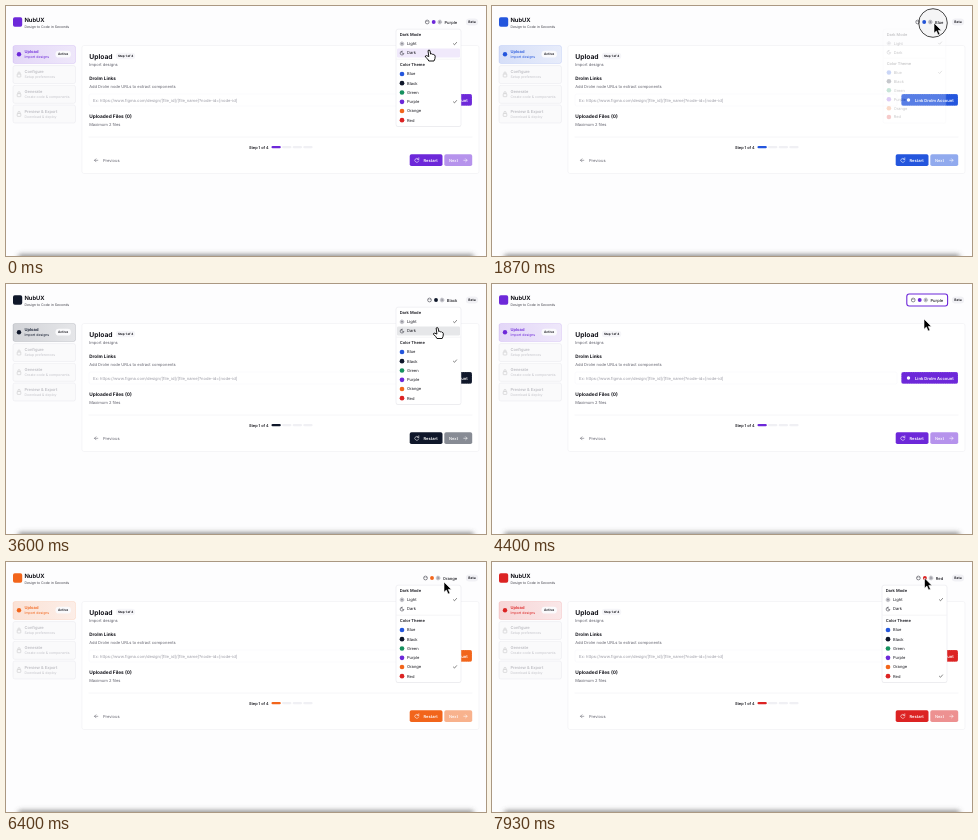
Recreate the animation shown at these times as an HTML page. Size 480 by 250 pixels, loop 8 s.

```html
<!DOCTYPE html>
<html lang="en">
<head>
<meta charset="utf-8">
<title>Theme picker</title>
<style>
html, body { margin: 0; width: 100%; height: 100%; overflow: hidden; background: #fff; }
svg { display: block; width: 100vw; height: 100vh; }
text { font-family: Inter, "Open Sans", sans-serif; font-size: 4.06px; fill: #15151c; text-rendering: geometricPrecision; white-space: pre; }
.main { fill: var(--main); }
.slow { fill: var(--slow); }
.line { fill: none; stroke-width: .55; stroke-linecap: round; stroke-linejoin: round; }
</style>
</head>
<body>
<svg id="stage" viewBox="0 0 480 250" xmlns="http://www.w3.org/2000/svg"></svg>
<script>
const LOOP = 8000;
const stage = document.getElementById('stage');

// Theme: color, menu row center, left edge of the label in the trigger
const themes = {
  Blue: { rgb: [36, 86, 221], row: 68, label: 443 },
  Black: { rgb: [15, 23, 42], row: 77.2, label: 440.8 },
  Green: { rgb: [22, 145, 95], row: 86.5, label: 440 },
  Purple: { rgb: [109, 40, 217], row: 95.8, label: 438.5 },
  Orange: { rgb: [242, 101, 27], row: 105, label: 436.8 },
  Red: { rgb: [220, 35, 35], row: 114.2, label: 443.7 }
};
const picks = [
  [-1000, 'Purple'], [1070, 'Blue'], [2570, 'Black'],
  [4030, 'Purple'], [5480, 'Orange'], [7080, 'Red']
];
const opens = [-1000, 1850, 3280, 4640, 6200, 7760];
const ripples = [1850, 6200, 7760];
// time, x, y of the pointer tip
const path = [
  [0, 423, 44], [70, 423, 44], [870, 419, 66], [1130, 419, 66], [1790, 442, 17],
  [1930, 442, 17], [2500, 424, 75], [2650, 424, 75], [2800, 428, 52], [3180, 437, 17],
  [3380, 437, 17], [3940, 420, 94], [4080, 420, 94], [4400, 432, 35], [4580, 438, 17],
  [4720, 438, 17], [5270, 417, 99], [5600, 417, 99], [6100, 437, 17], [6300, 437.5, 18],
  [6400, 438, 20], [6900, 416, 111], [7120, 416, 111], [7690, 432.5, 16], [8000, 432.5, 16]
];

const clamp = v => Math.max(0, Math.min(1, v));
const ease = v => { const c = clamp(v); return c * c * (3 - 2 * c); };
const css = rgb => `rgb(${rgb.map(Math.round)})`;
const mix = (a, b, k) => a.map((v, i) => v + (b[i] - v) * k);

const text = (x, y, str, attrs = '') => `<text x="${x}" y="${y}" ${attrs}>${str}</text>`;
const style = (size, weight = 400, fill = '#15151c') => `style="font-size:${size}px;font-weight:${weight};fill:${fill}"`;
const box = (x, y, w, h, r, attrs) => `<rect x="${x}" y="${y}" width="${w}" height="${h}" rx="${r}" ${attrs}/>`;
const line = (d, color, attrs = '') => `<path class="line" d="${d}" stroke="${color}" ${attrs}/>`;
const dot = (x, y, r, attrs) => `<circle cx="${x}" cy="${y}" r="${r}" ${attrs}/>`;
const sun = (x, y) => dot(x, y, 1.9, 'fill="#c9c9cf" stroke="#85858f" stroke-width=".5" stroke-dasharray=".8 .4"') +
  dot(x, y, .8, 'fill="#777781"');
const gray = '#62626d';

function step(y, title, note) {
  return `<g opacity=".42">${box(7, y, 62.5, 18, 2, 'fill="#f7f7f9" stroke="#c9c9d2" stroke-width=".5"')}
    ${box(11.2, y + 8.4, 3.6, 3, .5, 'fill="none" stroke="#777" stroke-width=".55"')}
    ${line(`M12 ${y + 8.3}v-1a1 1 0 0 1 2 0v1`, '#777')}
    ${text(18.5, y + 7.8, title, style(4.06, 500, '#555560'))}
    ${text(18.5, y + 12.7, note, style(3.5, 400, '#777782'))}</g>`;
}

const sidebar = `
  ${box(7, 39.5, 62.5, 18, 2, 'fill="url(#tint)" stroke="var(--slow)" stroke-opacity=".22" stroke-width=".5"')}
  ${dot(13, 48.3, 2.2, 'class="slow"')}
  ${text(18.5, 47.3, 'Upload', 'style="fill:var(--main);font-weight:600"')}
  ${text(18.5, 52.2, 'Import designs', 'style="fill:var(--main);font-size:3.5px"')}
  ${box(49.5, 44.8, 15.5, 6.8, 3.4, 'fill="#fafafc"')}
  ${text(52, 49.4, 'Active', style(3.3, 600))}
  ${step(59.6, 'Configure', 'Setup preferences')}
  ${step(79.3, 'Generate', 'Create code &amp; components')}
  ${step(99, 'Preview &amp; Export', 'Download &amp; deploy')}`;

const card = `
  ${box(76, 39.5, 397, 128, 2, 'fill="#fff" stroke="#f0f0f4" stroke-width=".6"')}
  ${text(83.2, 52.6, 'Upload', style(6.75, 700))}
  ${box(109.8, 46.7, 19.5, 6.6, 3.3, 'fill="#f6f6f9"')}
  ${text(112, 51.2, 'Step 1 of 4', style(3, 700))}
  ${text(83.2, 60.2, 'Import designs', style(4.06, 400, gray))}
  ${text(83.2, 73.8, 'Drolm Links', style(4.65, 700))}
  ${text(83.2, 82.2, 'Add Drolm node URLs to extract components', style(4.06, 400, gray))}
  ${box(83, 88, 322, 12, 1.8, 'fill="#fff" stroke="#f5f5f8" stroke-width=".5"')}
  ${text(87, 95.5, 'Ex: https://www.figma.com/design/[file_id]/[file_name]?node-id=[node-id]', style(4.12, 400, '#9a9aa4'))}
  ${text(83.2, 111.8, 'Uploaded Files (0)', style(4.8, 700))}
  ${text(83.2, 120.2, 'Maximum 2 files', style(4.06, 400, gray))}
  ${line('M83 131H466', '#efeff2')}
  ${text(243, 142.6, 'Step 1 of 4', style(3.9, 600))}
  ${[0, 1, 2, 3].map(i => box(265.5 + i * 10.6, 140, 9.3, 2.3, 1.1, i ? 'fill="#f0f0f4"' : 'class="main"')).join('')}
  ${line('M91.8 154.3H88.5M90 152.8L88.5 154.3 90 155.8', gray)}
  ${text(97, 155.8, 'Previous', style(4.06, 400, gray))}
  ${box(409.3, 88.1, 56.7, 11.7, 1.8, 'class="main" stroke="#fff" stroke-opacity=".5" stroke-width=".5" stroke-dasharray="1 .8"')}
  ${dot(416.5, 94, 1.7, 'fill="#fff"')}
  ${text(423, 95.5, 'Link Drolm Account', style(4.12, 600, '#fff'))}
  ${box(403.7, 148.3, 32.8, 11.8, 1.8, 'class="main"')}
  ${line('M412.6 153.3a2 2 0 1 0 .2 1.6M412.8 151.8v1.6h-1.6', '#fff')}
  ${text(417.5, 155.8, 'Restart', style(4.06, 600, '#fff'))}
  ${box(438.3, 148.3, 27.9, 11.8, 1.8, 'class="main" opacity=".5"')}
  ${text(443, 155.8, 'Next', style(4.06, 500, '#fff'))}
  ${line('M457.8 154.3h3.2M459.6 152.8l1.5 1.5-1.5 1.5', '#fff')}`;

const header = `
  ${box(7, 11.3, 9.2, 9.4, 1.8, 'class="slow"')}
  ${text(18.4, 16.2, 'NubUX', style(5.8, 700))}
  ${text(18.4, 21.6, 'Design to Code in Seconds', style(3.5, 400, '#44444e'))}
  ${box(459.8, 12.5, 12.4, 7, 3.5, 'fill="#f1f1f5"')}
  ${text(462.2, 17.3, 'Beta', style(3.4, 600))}
  ${box(414.8, 10, 40.8, 12, 2.4, 'id="ring" fill="#fff" stroke="var(--main)" stroke-width="1.1"')}
  <g id="icons">
    ${dot(-17.3, 16, 1.9, 'fill="none" stroke="#33333d" stroke-width=".55"')}
    ${dot(-17.9, 15.3, .4, 'fill="#33333d"')}${dot(-16.6, 15.4, .4, 'fill="#33333d"')}
    ${dot(-10.8, 16, 1.95, 'class="slow"')}
    ${sun(-4.7, 16)}
    ${text(0, 17.5, '', 'id="label" style="font-weight:500"')}
  </g>`;

const check = (id, y) => line(`M447.4 ${y}l1.1 1.1 2.1-2.4`, '#222', id ? `id="${id}"` : '');
const menu = `<g id="menu">
  ${box(390, 24, 65, 97, 2, 'fill="#000" opacity=".06"')}
  ${box(390, 23.2, 65, 97.3, 2, 'fill="#fff" stroke="#e3e3e9" stroke-width=".5"')}
  ${box(391, 42.4, 63, 9.2, 1.4, 'id="hover" class="main" fill-opacity=".1"')}
  ${text(393.7, 29.8, 'Dark Mode', style(4.06, 600))}
  ${sun(396, 37.8)}${text(401, 39.2, 'Light')}${check('', 37.7)}
  ${line('M396 45.2a1.9 1.9 0 1 0 1.9 2.2a1.5 1.5 0 0 1-1.9-2.2', '#33333d')}
  ${text(401, 48.4, 'Dark')}
  ${line('M390.5 53.2H454.5', '#ececf0')}
  ${text(393.7, 60.2, 'Color Theme', style(4.06, 600))}
  ${Object.entries(themes).map(([name, { rgb, row }]) =>
    dot(396, row, 2.35, `fill="${css(rgb)}"`) + text(401, row + 1.4, name)).join('')}
  ${check('tick', 0)}</g>`;

const pointer = `
  <g id="ripple">${dot(0, 0, 14.3, 'fill="#000" fill-opacity=".03" stroke="#333" stroke-width=".9"')}</g>
  <path id="arrow" d="M0 0V10.2L2.4 8 4.1 12 6 11.2 4.3 7.4H7.4Z" fill="#000" stroke="#fff" stroke-width=".6"/>
  <path id="hand" d="M-1 .6Q0-.6 1 .6L1.6 4.1Q2.6 3.3 3.3 4.3Q4.4 3.8 4.9 4.9Q6.1 4.8 6.2 6.2Q6.3 8.8 5 11H-.2Q-1 8.7-3.6 7Q-4.2 5.7-2.5 5.6L-.2 6.6Z"
    fill="#fff" stroke="#000" stroke-width=".9" stroke-linejoin="round"/>`;

stage.innerHTML = `
  <defs>
    <linearGradient id="tint">
      <stop stop-color="var(--slow)" stop-opacity=".18"/>
      <stop offset="1" stop-color="var(--slow)" stop-opacity=".1"/>
    </linearGradient>
    <filter id="blur" x="-10%" y="-300%" width="120%" height="700%"><feGaussianBlur stdDeviation="2.6"/></filter>
  </defs>
  ${box(0, 0, 480, 250, 0, 'fill="#fdfdfe"')}
  ${header}${sidebar}${card}${menu}
  ${box(12, 248.5, 456, 6, 3, 'fill="#555" fill-opacity=".7" filter="url(#blur)"')}
  ${pointer}`;

const el = id => document.getElementById(id);
const [ring, icons, label, menuEl, hover, tick, ripple, arrow, hand] =
  ['ring', 'icons', 'label', 'menu', 'hover', 'tick', 'ripple', 'arrow', 'hand'].map(el);
const show = (node, on) => node.setAttribute('opacity', +on);
const move = (node, x, y) => node.setAttribute('transform', `translate(${x} ${y})`);

function pointerAt(t) {
  const i = Math.max(1, path.findIndex(p => p[0] >= t));
  const a = path[i - 1], b = path[i];
  const k = ease((t - a[0]) / (b[0] - a[0]));
  return [a[1] + (b[1] - a[1]) * k, a[2] + (b[2] - a[2]) * k];
}

function render(t) {
  const index = picks.findLastIndex(p => p[0] <= t);
  const [since, name] = picks[index];
  const before = themes[picks[Math.max(0, index - 1)][1]].rgb;
  const theme = themes[name];
  const color = duration => css(mix(before, theme.rgb, ease((t - since) / duration)));
  stage.style.setProperty('--main', color(160));
  stage.style.setProperty('--slow', color(260));

  const opened = opens[index];
  const isOpen = t >= opened;
  const shown = isOpen ? clamp((t - opened) / 90) : index ? 1 - clamp((t - since) / 140) : 0;
  const scale = .955 + .045 * shown;
  menuEl.setAttribute('opacity', shown);
  menuEl.setAttribute('transform', `translate(422 23) scale(${scale}) translate(-422 -23)`);
  move(tick, 0, (isOpen || !index ? theme : themes[picks[index - 1][1]]).row);

  show(ring, !isOpen && t - since > 250);
  move(icons, theme.label, 0);
  if (label.textContent !== name) label.textContent = name;

  const [x, y] = pointerAt(t);
  const rows = [37.8, 47, ...Object.values(themes).map(v => v.row)];
  const row = rows.find(r => Math.abs(y - r) <= 4.63);
  show(hover, row !== undefined);
  if (row !== undefined) hover.setAttribute('y', row - 4.6);

  const overItems = y > 42;
  const swapping = t > 2760 && t < 2860;
  show(hand, overItems);
  show(arrow, !overItems || swapping);
  move(hand, x, y);
  move(arrow, x + (swapping ? 2 : 0), y - (swapping ? 5 : 0));
  show(ripple, ripples.some(r => t > r - 70 && t < r + 50));
  move(ripple, x - 1, y);
}

const start = performance.now();
function tickFrame() {
  render((performance.now() - start) % LOOP);
  requestAnimationFrame(tickFrame);
}
tickFrame();
</script>
</body>
</html>
```
